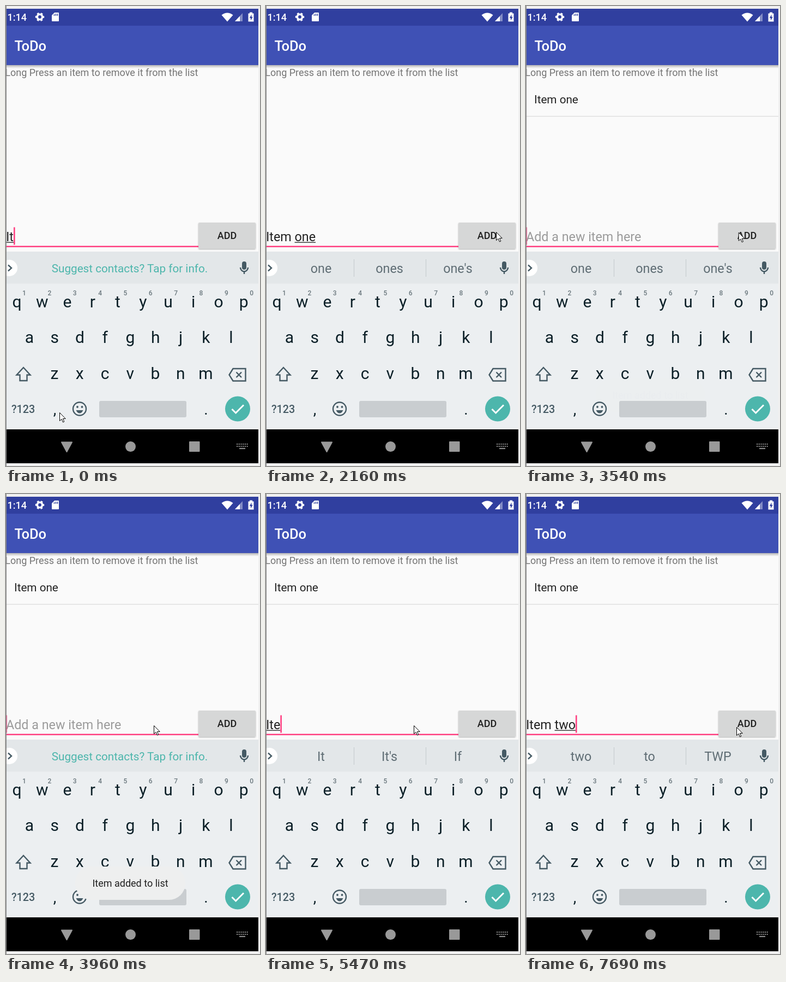
Write an HTML page that moves like this. It is 466 by 841 pixels and loops after 8 s.

```html
<!DOCTYPE html>
<html lang="en">
<head>
<meta charset="utf-8">
<title>To-do list</title>
<style>
html, body { margin: 0; width: 100%; height: 100%; overflow: hidden; background: #f0f0f0; }
svg { display: block; width: 466px; height: 841px; font-family: Roboto, sans-serif; }
text { white-space: pre; }
.mid { text-anchor: middle; }
.med { font-weight: 500; }
.line { fill: none; stroke: #455a64; stroke-width: 2.4; }
</style>
</head>
<body>
<svg viewBox="0 0 466 841">
  <defs>
    <clipPath id="screen"><path d="M1 5H463V836H1Z"/></clipPath>
    <clipPath id="face"><rect x="353" y="396" width="105" height="48" rx="2"/></clipPath>
    <linearGradient id="shade" x2="0" y2="1">
      <stop stop-opacity=".28"/><stop offset="1" stop-opacity="0"/>
    </linearGradient>
    <filter id="low" x="-10%" y="-20%" width="120%" height="150%">
      <feDropShadow dx="0" dy="1" stdDeviation="1" flood-opacity=".3"/>
    </filter>
    <filter id="high" x="-10%" y="-20%" width="120%" height="150%">
      <feDropShadow dx="0" dy="2" stdDeviation="2.5" flood-opacity=".45"/>
    </filter>
  </defs>
  <rect width="1" height="841" fill="#858585"/>

  <g clip-path="url(#screen)">
    <rect y="5" width="463" height="445" fill="#fafafa"/>
    <rect y="108" width="463" height="6" fill="url(#shade)"/>
    <rect y="36" width="463" height="72" fill="#3f51b5"/>
    <rect y="5" width="463" height="31" fill="#303f9f"/>

    <!-- status bar -->
    <g fill="#fff">
      <text x="2.5" y="27" font-size="18" class="med">1:14</text>
      <g fill="none" stroke="#fff">
        <circle cx="62" cy="20" r="4.7" stroke-width="3.6"/>
        <circle cx="62" cy="20" r="7" stroke-width="2.4" stroke-dasharray="3.6 3.73" stroke-dashoffset="1.8"/>
      </g>
      <path d="M89 12H96Q97 12 97 13V27Q97 28 96 28H85Q84 28 84 27V17Z"/>
      <path d="M88.5 15v3M91.5 14v4M94.5 14v4" stroke="#303f9f" stroke-width="1.4"/>
      <path d="M395.5 16.5Q406 8.500 416.500 16.500L406 28.500Z"/>
      <path d="M420 28L434 13V28Z" opacity=".4"/>
      <path d="M420 28L429 18.500V28Z"/>
      <path d="M447 11.500H452V13.500H454.500V28.500H444.500V13.500H447Z"/>
      <path d="M450.500 15.500L446.800 22H449V26.500L452.600 20H450.500Z" fill="#303f9f"/>
      <text x="15.500" y="82" font-size="25.500" class="med">ToDo</text>
    </g>

    <!-- list -->
    <text x="352.500" y="128" font-size="18" fill="#757575" text-anchor="end">Long Press an item to remove it from the list</text>
    <g id="row">
      <text x="15" y="178" font-size="20.700" fill="#212121">Item one</text>
      <rect y="201" width="463" height="1.300" fill="#dcdcdc"/>
    </g>

    <!-- entry -->
    <rect y="438.500" width="354" height="2.500" fill="#ff4081"/>
    <text id="hint" y="430" font-size="23.300" fill="#9b9b9b">Add a new item here</text>
    <text id="entry" y="430" font-size="23.300" fill="#212121"></text>
    <rect id="under" y="431.500" height="1.300" fill="#212121"/>
    <rect id="caret" y="404.500" width="2.600" height="32" fill="#ff4081"/>
    <rect id="button" x="353" y="396" width="105" height="48" rx="2" fill="#d6d7d7"/>
    <circle id="ripple" cx="414" cy="418" fill="#b9bbbb" clip-path="url(#face)"/>
    <text x="405.500" y="426" font-size="18" fill="#212121" class="mid med">ADD</text>

    <!-- keyboard -->
    <rect y="449" width="463" height="59" fill="#e3e7e9"/>
    <rect y="507.500" width="463" height="267" fill="#eceff1"/>
    <circle cx="6" cy="479" r="15" fill="#fff"/>
    <path d="M4 473.500L10 479L4 484.500" class="line"/>
    <text id="offer" x="227" y="487" font-size="20.700" fill="#4db6ac" class="mid">Suggest contacts? Tap for info.</text>
    <g id="words" font-size="23.300" fill="#5f6d74" class="mid">
      <path d="M161.500 463V495M293.500 463V495" stroke="#c3c9cc"/>
      <text x="101" y="488"></text><text x="226.500" y="488"></text><text x="352" y="488"></text>
    </g>
    <rect x="433" y="467" width="8" height="15" rx="4" fill="#455a64"/>
    <path d="M430 478A7 7.500 0 0 0 444 478M437 485.500V490" class="line" stroke-width="2"/>
    <g id="keys" class="mid" fill="#0b1f27"></g>
    <path d="M32 661L44.500 674.500H38.500V685H25.500V674.500H19.500Z" class="line"/>
    <path d="M416.500 663H439.500V685.500H416.500L409.500 674.300Z M422.500 669.500L432 679M432 669.500L422.500 679" class="line"/>
    <text x="10" y="744" font-size="19.700" fill="#455a64" class="med">?123</text>
    <circle cx="135" cy="736.500" r="12" class="line"/>
    <path d="M128.500 739H141.500Q139 744.500 135 744.500T128.500 739Z" fill="#455a64"/>
    <g fill="#455a64"><circle cx="131" cy="733" r="1.900"/><circle cx="139.500" cy="733" r="1.900"/></g>
    <rect x="171" y="722" width="160" height="30" rx="3" fill="#c9cdd0"/>
    <circle cx="425" cy="736.500" r="23" fill="#4db6ac"/>
    <path d="M414.500 737L421.500 744L436 729.500" fill="none" stroke="#fff" stroke-width="3"/>

    <!-- navigation -->
    <rect y="774" width="463" height="62" fill="#000"/>
    <g fill="#999">
      <path d="M102 797.500H121L111.500 815Z" stroke="#999" stroke-width="2" stroke-linejoin="round"/>
      <circle cx="228.500" cy="805.500" r="9.500"/>
      <rect x="336" y="796" width="19.500" height="19" rx="1"/>
      <path d="M423 801H444M423 805H444" stroke="#888" stroke-width="2.200" stroke-dasharray="2.200 1.500"/>
      <path d="M428 809H439" stroke="#888" stroke-width="2.200"/>
    </g>

    <g id="toast">
      <rect x="127" y="681" width="202" height="61" rx="30" fill="#eeefef"/>
      <text x="228" y="718" font-size="18" fill="#212121" class="mid">Item added to list</text>
    </g>
  </g>
  <path id="mouse" d="M0 0V15L3.500 11.800L6 17.500L8.300 16.500L5.900 11H10.700Z" fill="#fff" stroke="#000" stroke-linejoin="round"/>
</svg>
<script>
const el = id => document.getElementById(id);
const set = (id, attrs) => { for (const k in attrs) el(id).setAttribute(k, attrs[k]); };
const show = (id, on) => { el(id).style.display = on ? "" : "none"; };
const within = (t, a, b) => t >= a && t < b;
const clamp = v => Math.max(0, Math.min(1, v));
const ramp = (t, a, b) => clamp((t - a) / (b - a));

function key(char, x, y, size, extra = "") {
  return `<text x="${x}" y="${y}" font-size="${size}" ${extra}>${char}</text>`;
}
const rows = [["qwertyuiop", 20, 551], ["asdfghjkl", 43, 616], ["zxcvbnm", 89, 682]];
let keys = key(",", 89.5, 747, 28) + key(".", 367, 747, 28);
for (const [chars, x, y] of rows)
  [...chars].forEach((c, i) => { keys += key(c, x + 46.25 * i, y, 30); });
[..."1234567890"].forEach((c, i) => {
  keys += key(c, 33.5 + 46.35 * i, 529, 12, 'fill="#6b787e" class="med"');
});
el("keys").innerHTML = keys;

// Each list holds [start time, value]
const typed = [
  [0, "It"], [130, "Ite"], [270, "Item"], [410, "Item "], [550, "Item o"],
  [680, "Item on"], [820, "Item one"], [2830, ""], [5210, "I"], [5340, "It"],
  [5470, "Ite"], [5610, "Item"], [5760, "Item "], [6180, "Item t"],
  [6300, "Item tw"], [6580, "Item two"]
];
const suggested = [
  [0, ""], [130, "It,It's,If"], [270, "Item,Items,It's"], [410, "is,in,and"],
  [550, "o,of,on"], [680, "on,one,in"], [820, "one,ones,one's"], [3680, ""],
  [5470, "It,It's,If"], [5610, "Item,Items,It's"], [5910, "is,in,and"],
  [6180, "t,to,the"], [6300, "tw,two,the"], [6580, "two,to,TWP"]
];
const caretOff = [[1220, 1760], [2160, 2830], [7140, 7440]];
const path = [
  [0, 98.5, 743.5], [1360, 98.5, 743.5], [2160, 422.5, 413.5], [2300, 422.5, 413.5],
  [2430, 412.5, 412.5], [3400, 412.5, 412.5], [3960, 271.5, 423.5],
  [7310, 271.5, 423.5], [7500, 330.5, 436.5], [7690, 386.5, 426.5], [8000, 386.5, 426.5]
];
const at = (list, t) => list.findLast(([start]) => start <= t)[1];

function pointer(t) {
  const i = path.findIndex(([time]) => time > t);
  const [t0, x0, y0] = path[i - 1], [t1, x1, y1] = path[i];
  const p = ramp(t, t0, t1), e = p * p * (3 - 2 * p);
  return [x0 + (x1 - x0) * e, y0 + (y1 - y0) * e];
}

function draw(t) {
  const text = at(typed, t), entry = el("entry");
  entry.textContent = text;
  const width = text ? entry.getComputedTextLength() : 0;
  const start = text.lastIndexOf(" ") + 1;
  const from = start ? entry.getSubStringLength(0, start) : 0;
  set("under", { x: from, width: Math.max(0, width - from) });
  set("caret", { x: text ? width : -0.8 });
  show("caret", !caretOff.some(([a, b]) => within(t, a, b)));
  show("hint", !text);
  show("row", t >= 2830);

  const words = at(suggested, t);
  show("offer", !words);
  show("words", words);
  const parts = words.split(",");
  el("words").querySelectorAll("text").forEach((n, i) => { n.textContent = parts[i] || ""; });

  const pressed = within(t, 2430, 3270);
  set("button", { filter: pressed ? "url(#high)" : "url(#low)" });
  set("ripple", { r: 38 + 40 * ramp(t, 2430, 2830), opacity: pressed ? 1 - ramp(t, 3120, 3270) : 0 });
  set("toast", { opacity: ramp(t, 3540, 3960) * (1 - ramp(t, 4900, 5210)) });
  set("mouse", { transform: `translate(${pointer(t)})` });
}

const begin = performance.now();
function tick() {
  draw((performance.now() - begin) % 8000);
  requestAnimationFrame(tick);
}
tick();
</script>
</body>
</html>
```
